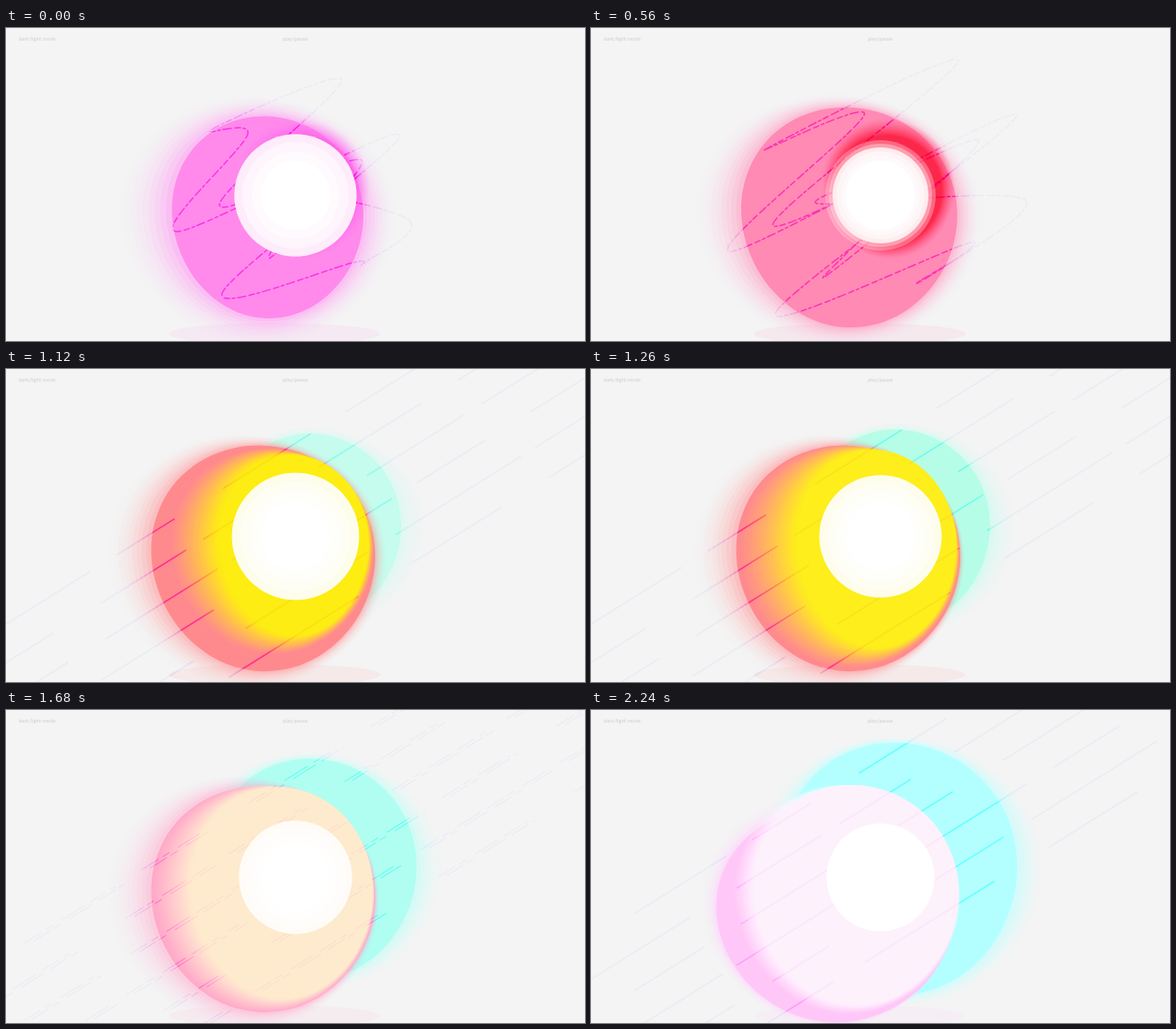
An HTML page that plays this animation: 640 by 346 pixels, repeating every 2310 ms.

```html
<!DOCTYPE html>
<html lang="en">
<head>
<meta charset="utf-8">
<title>Glow</title>
<style>
  html, body { margin: 0; width: 100%; height: 100%; overflow: hidden; background: #f4f4f4; }
  svg { display: block; width: 100vw; height: 100vh; }
  text { font: 5.8px Lato, "Open Sans", sans-serif; fill: #cdcdcd; }
  .ink { fill: none; stroke: rgb(130,145,255); mix-blend-mode: color-burn; }
</style>
</head>
<body>
<svg id="stage" viewBox="0 0 640 346" preserveAspectRatio="none">
  <rect width="640" height="346" fill="#f4f4f4"/>
</svg>
<script>
const LOOP = 2310, STEP = 70;
const stage = document.getElementById('stage');

function set(el, attrs) {
  for (const k in attrs) el.setAttribute(k, attrs[k]);
}
function add(tag, attrs, text) {
  const el = document.createElementNS('http://www.w3.org/2000/svg', tag);
  set(el, attrs);
  if (text) el.textContent = text;
  stage.appendChild(el);
  return el;
}
const mix = (a, b, u) => Array.isArray(a) ? a.map((v, i) => mix(v, b[i], u)) : a + (b - a) * u;
const ramp = (t, from, to) => Math.min(1, Math.max(0, (t - from) / (to - from)));
const smooth = u => u * u * (3 - 2 * u);
const hsl = (h, s, l) => `hsl(${h.toFixed(1)},${s.toFixed(1)}%,${l.toFixed(1)}%)`;
const xy = (x, y) => x.toFixed(1) + ' ' + y.toFixed(1);

// Closed smooth curve through points
function loopPath(pts) {
  const n = pts.length, p = i => pts[(i + n) % n];
  let d = 'M' + xy(...pts[0]);
  for (let i = 0; i < n; i++) {
    const [a, b, c, e] = [p(i - 1), p(i), p(i + 1), p(i + 2)];
    d += 'C' + xy(b[0] + (c[0] - a[0]) / 6, b[1] + (c[1] - a[1]) / 6) + ' '
      + xy(c[0] - (e[0] - b[0]) / 6, c[1] - (e[1] - b[1]) / 6) + ' ' + xy(...c);
  }
  return d + 'Z';
}

// Slightly uneven ellipse: centre x, y and radii
function blobPath([cx, cy, rx, ry]) {
  const pts = [];
  for (let i = 0; i < 24; i++) {
    const a = i * Math.PI / 12;
    const r = 1 + .014 * Math.cos(2 * (a - .87)) + .012 * Math.cos(3 * (a - 3.75));
    pts.push([cx + rx * r * Math.cos(a), cy + ry * r * Math.sin(a)]);
  }
  return loopPath(pts);
}

// A blob inside larger copies whose summed opacity rises inward to peak
function glow(bands, power, peak) {
  const parts = [];
  const level = i => peak * (i / bands) ** power;
  for (let i = 1; i <= bands + 1; i++) parts.push(add('path', {}));
  return (inner, outer, fill, opacity = 1) => parts.forEach((el, i) => {
    const alpha = i < bands ? (level(i + 1) - level(i)) / (1 - level(i)) : 1;
    set(el, {
      d: blobPath(mix(outer, inner, i / bands)),
      fill, 'fill-opacity': (alpha * opacity).toFixed(3)
    });
  });
}

const aqua = glow(7, 1.4, .5);
const haze = add('ellipse', { cx: 297, cy: 338, rx: 117, ry: 12, 'fill-opacity': .1 });
const pink = glow(9, 2, .5);
const warm = glow(16, 1.2, .97);

const warmHue = t => 310 + 106 * ramp(t, 0, 910) ** 2 - 103 * ramp(t, 1260, 2240) ** 2;

function drawAqua(t) {
  const k = ramp(t, 1260, 2240), rx = 101 + (t - 1260) * .0306, ry = 108 + (t - 1260) * .0316;
  aqua([340, 174, rx, ry], [342, 176, rx + 25, ry + 9],
    hsl(162 + 18 * k, 100, 83 + 2 * k), .85 * ramp(t, 840, 1350) + .15 * k);
}

function drawPink(t) {
  const grow = 1 - (1 - ramp(t, 0, 1100)) ** 2, side = ramp(t, 910, 1260), sink = ramp(t, 1680, 2240);
  const core = [289 - 5 * grow - 15 * sink, 208 + 17 * sink, 106 + 18 * grow + 7 * sink, 111.5 + 13 * grow - 6 * sink];
  const halo = [278 - 5 * grow - 10 * side, 211 + 8 * sink, 153 + 7 * grow - 10 * side - 8 * sink, 137 + 3 * grow - 10 * sink];
  const fill = hsl(310 + 48 * smooth(ramp(t, 0, 1000)) - 50 * ramp(t, 1260, 2240), 100, 77 + 12 * ramp(t, 1260, 2240));
  set(haze, { fill });
  pink(core, halo, fill);
}

function drawWarm(t) {
  const grow = smooth(ramp(t, 560, 1400)), late = ramp(t, 1260, 2240);
  const inner = mix([329, 179, 59, 61], [314, 199, 91, 113], grow);
  const outer = mix([329, 177, 73, 77], [283, 208, 125, 126], grow);
  const fill = hsl(warmHue(t), 98 - 20 * ramp(t, 1680, 2240),
    69 - 19 * ramp(t, 0, 910) + 5 * ramp(t, 910, 1260) + 35 * ramp(t, 1260, 1680) + 7 * ramp(t, 1680, 2240));
  warm(mix(inner, [293, 203, 113, 121], late), outer, fill, .5 + .5 * ramp(t, 0, 910));
}

// Zigzag tips, pulled apart in turn to the right and to the left
const TIPS = [
  [445, 212], [395, 260], [385, 259], [239, 293], [435, 118], [189, 225], [267, 118],
  [228, 112], [371, 58], [236, 196], [393, 146], [292, 254], [325, 185], [285, 172]
];
const zig = add('path', { class: 'ink', 'stroke-width': 1.5, 'stroke-linecap': 'round', 'stroke-dasharray': '9 3 3 3 6 4' });

function drawZig(t) {
  const pull = t <= 560 ? t / 560 : 2 ** ((t - 560) / STEP);
  set(zig, {
    visibility: t < 800 ? 'visible' : 'hidden',
    d: loopPath(TIPS.map(([x, y], i) => {
      const side = i % 2 ? -pull : pull;
      return [x + 35 * side, y - 22 * side];
    }))
  });
}

// Six parallel lines cut into runs of random length
let seed = 11;
const random = () => (seed = seed * 16807 % 2147483647) / 2147483647;
const streaks = [];
for (let k = 0; k < 6; k++) {
  const runs = [];
  for (let x = -140 * random(); x < 700;) {
    const end = x + 60 + 90 * random();
    runs.push([x, end]);
    x = end + 15 + 45 * random();
  }
  streaks.push({ runs, el: add('path', { class: 'ink' }) });
}

function drawStreaks(t) {
  const base = 282 - 27 * ramp(t, 1260, 2240);
  const fast = t < 1100, rough = fast || (t > 1500 && t < 1950);
  streaks.forEach(({ runs, el }, k) => {
    const line = (x, drop) => xy(x, base + 42.6 * k + drop - .625 * x);
    const slide = (t - 1260) * .05;
    let d = '';
    for (const [a, b] of runs) {
      d += 'M' + line(a + slide, 0) + 'L' + line(b + slide, 0);
      if (rough) d += 'M' + line(a + slide + 9, fast ? 1.3 : 4) + 'L' + line(b + slide + 9, fast ? 1.3 : 4);
    }
    set(el, {
      d, visibility: t < 800 ? 'hidden' : 'visible',
      'stroke-width': rough ? 1.1 : 1.6,
      'stroke-dasharray': fast ? '58 6' : rough ? '22 5 9 11 30 8' : 'none'
    });
  });
}

// Central disc: a fading rim, the tinted face and paler rings inside
const disc = [.3, .35, 1, .5, .5, 1].map(o => add('circle', { cx: 320, cy: 185, fill: '#fff', 'fill-opacity': o }));

function drawDisc(t) {
  const r = t < 910 ? 67.5 - 14.5 * ramp(t, 0, 560) + 23 * ramp(t, 560, 910)
    : 58 + 18 * Math.exp((910 - t) / 550);
  const rim = 8 * (ramp(t, 0, 560) - ramp(t, 560, 910));
  const radii = [r + rim, r + rim / 2, r, mix(38, r, .7), mix(38, r, .35), 38.5];
  disc.forEach((el, i) => set(el, { r: radii[i].toFixed(2) }));
  set(disc[2], { fill: hsl(warmHue(t), 90, 96 + 4 * ramp(t, 1260, 1900)) });
}

add('text', { x: 14, y: 13.5 }, 'dark/light mode');
add('text', { x: 306, y: 13.5 }, 'play/pause');

function draw(ms) {
  let t = Math.floor((ms % LOOP) / STEP) * STEP;
  if (t === 1750 || t === 2100) t -= STEP;   // two held poses
  for (const part of [drawAqua, drawPink, drawWarm, drawZig, drawStreaks, drawDisc]) part(t);
}

const start = performance.now();
function tick() {
  draw(performance.now() - start);
  requestAnimationFrame(tick);
}
tick();
</script>
</body>
</html>
```
